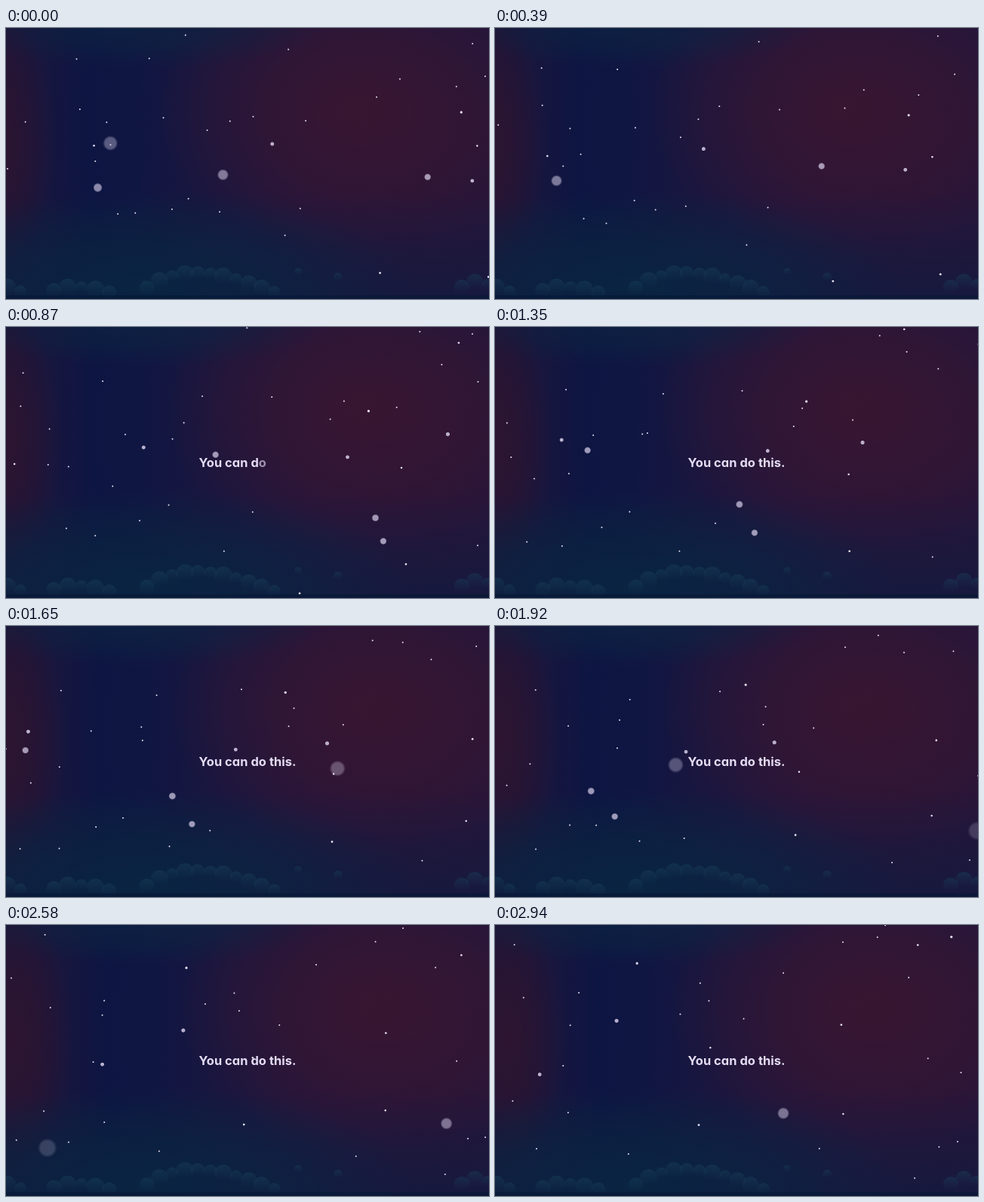
Recreate the animation shown at these times as an HTML page with a canvas. Size 640 by 360 pixels, loop 2.97 s.

```html
<!DOCTYPE html>
<html lang="en">
<head>
<meta charset="utf-8">
<title>Night sky</title>
<style>
html, body { margin: 0; width: 100%; height: 100%; overflow: hidden; background: #12163f; }
canvas { position: absolute; left: 0; top: 0; display: block; }
p {
  position: absolute; left: 0; top: 168px; width: 640px; margin: 0;
  font: 700 16.5px/24px Inter, "Open Sans", sans-serif;
  font-feature-settings: "cv11";
  color: #e4dcf4; text-align: center; white-space: pre;
}
</style>
</head>
<body>
<canvas id="sky" width="640" height="360"></canvas>
<p id="line"></p>
<script>
const W = 640, H = 360, LOOP = 2970;
const SWAY = 33, RATE = 1.15;
const ctx = document.getElementById('sky').getContext('2d');

let seed = 29;
function random() {
  seed = (seed * 16807) % 2147483647;
  return seed / 2147483647;
}

// Distant stars: every fifth one is a little closer and faster.
const distant = Array.from({ length: 48 }, (_, i) => {
  const speed = 50 + 45 * random() + (i % 5 ? 0 : 65);
  return {
    x: random() * (W + speed * LOOP / 1000),
    y: random() * (H - 20),
    speed,
    phase: random() * 2 * Math.PI
  };
});

// The large close ones: x, y, speed to the left in px/s, phase of the sway
const close = [
  [618, 203, 190, -3.33], [353, 154, 196, .88], [764, 111, 205, -.37],
  [559, 198, 323, -3.18], [783, 281, 325, .96], [790, 278, 345, 1.95],
  [122, 212, 430, 0], [288, 195, 528, .78], [2029, 258, 560, 0],
  [139, 153, 700, 0], [1661, 158, 740, 0], [2339, 256, 885, -2.4]
].map(([x, y, speed, phase]) => ({ x, y, speed, phase }));

const stars = [...distant, ...close];

function addStops(g, stops) {
  stops.forEach(([at, color]) => g.addColorStop(at, color));
  return g;
}

function fill(style, y = 0) {
  ctx.fillStyle = style;
  ctx.fillRect(0, y, W, H - y);
}

function glow(x, y, rx, ry, rgb, alpha) {
  ctx.save();
  ctx.translate(x, y);
  ctx.scale(rx, ry);
  ctx.fillStyle = addStops(ctx.createRadialGradient(0, 0, 0, 0, 0, 1), [
    [0, `rgba(${rgb},${alpha})`], [.5, `rgba(${rgb},${alpha * .65})`], [1, `rgba(${rgb},0)`]
  ]);
  ctx.fillRect(-1, -1, 2, 2);
  ctx.restore();
}

function drawSky(t) {
  const drift = 10 * t;
  fill(addStops(ctx.createLinearGradient(drift, 0, W + drift, 0), [
    [0, '#1c153b'], [.08, '#17163f'], [.17, '#0d1542'], [.27, '#101642'],
    [.42, '#1a163f'], [.65, '#21163e'], [1, '#22163c']
  ]));
  glow(drift - 15, 150, 80, 190, '50,20,44', .75);
  glow(470 + drift, 110, 270, 190, '68,22,42', .65);
  glow(540, 210, 230, 150, '52,20,50', .35);
  fill(addStops(ctx.createLinearGradient(0, 220, 0, H), [
    [0, 'rgba(18,26,62,0)'], [1, 'rgba(18,26,62,.7)']
  ]));
  glow(190, 345, 350, 130, '8,38,66', .85);
  glow(180, -5, 240, 60, '12,38,66', .65);
  drawCloud(178, 364, 28);
  drawCloud(54, 146, 10);
  drawCloud(595, 665, 16);
  drawCloud(-25, 28, 10);
  drawPuff(387, 324, 5);
  drawPuff(440, 331, 6);
  fill('rgba(8,24,54,.6)', 355);
}

function drawPuff(x, y, r) {
  ctx.fillStyle = addStops(ctx.createLinearGradient(0, y - r, 0, y + r * .8), [
    [0, 'rgba(26,68,92,.42)'], [1, 'rgba(26,68,92,0)']
  ]);
  ctx.beginPath();
  ctx.arc(x, y, r, 0, 7);
  ctx.fill();
}

// A row of overlapping puffs, steep on the left and sloping off to the right.
function drawCloud(from, to, height) {
  const count = Math.round((to - from) / 17);
  for (let i = 0; i < count; i++) {
    const u = (i + .5) / count;
    const r = 10 + 2 * Math.sin(i * 2.4);
    drawPuff(from + u * (to - from), 354 - height * Math.sin(Math.PI * u ** .75), r);
  }
}

function drawStar({ x, y, speed, phase }, t) {
  const r = Math.max(1, speed / 70 - .4);
  const px = x - speed * t;
  if (px < -20 || px > W + 20) return;
  const py = y + SWAY * (Math.sin(RATE * t + phase) - Math.sin(phase));
  const alpha = r < 2 ? .97 : Math.max(.14, 1 - r * .065);
  const rgb = r < 2 ? '240,234,252' : '214,205,232';
  if (r < 2) {
    ctx.fillStyle = `rgba(${rgb},${alpha})`;
  } else {
    ctx.fillStyle = addStops(ctx.createRadialGradient(px, py, 0, px, py, r + .5), [
      [0, `rgba(${rgb},${alpha})`], [.7, `rgba(${rgb},${alpha})`], [1, `rgba(${rgb},0)`]
    ]);
  }
  ctx.beginPath();
  ctx.arc(px, py, r + (r < 2 ? 0 : .5), 0, 7);
  ctx.fill();
}

const line = document.getElementById('line');
const letters = [...'You can do this.'].map(c => {
  const span = document.createElement('span');
  span.textContent = c;
  line.append(span);
  return span;
});

function frame() {
  const ms = performance.now() % LOOP, t = ms / 1000;
  drawSky(t);
  stars.forEach(s => drawStar(s, t));
  letters.forEach((el, i) => {
    el.style.opacity = Math.min(1, Math.max(0, (ms - 395 - 48 * i) / 70));
  });
  requestAnimationFrame(frame);
}
frame();
</script>
</body>
</html>
```
